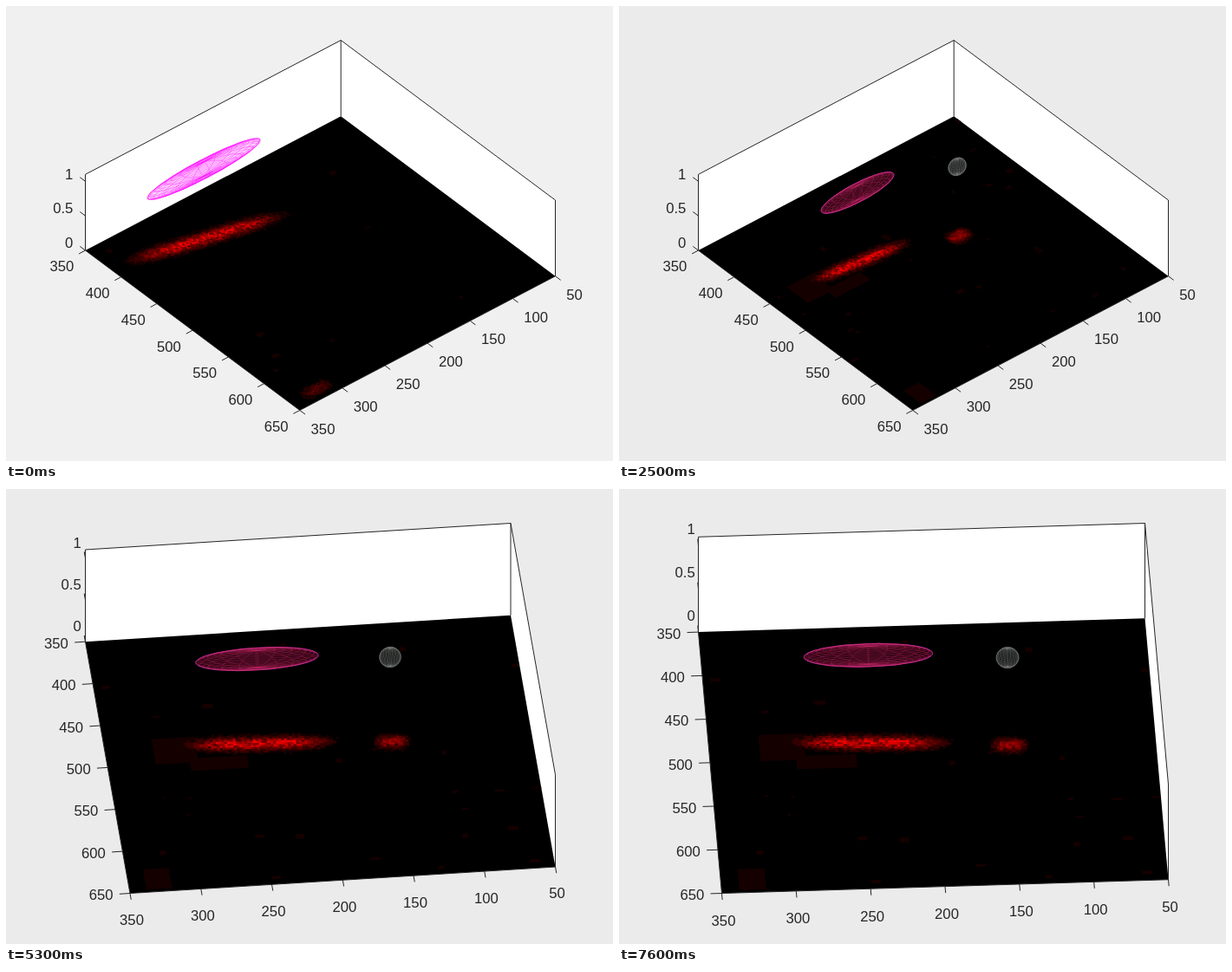
Animation, 700 px wide and 525 px high, one loop 7700 ms. Source, as an HTML page:

```html
<!DOCTYPE html>
<html lang="en">
<head>
<meta charset="utf-8">
<title>Tracked cells</title>
<style>
html, body { margin: 0; width: 100%; height: 100%; overflow: hidden; background: #ebebeb; }
svg { display: block; width: 100%; height: 100%; }
text { font: 16.7px "Liberation Sans", Arial, sans-serif; fill: #262626; }
</style>
</head>
<body>
<svg id="stage" viewBox="0 0 700 525"></svg>
<script>
const LOOP = 7700, STEP = 100, TAU = Math.PI * 2, LEVELS = 9;
// steps at which the cell splits, comes to rest, and the view turns
const SPLIT = 9, REST = 35, TURN = 36, TILT = 55, BACK = 66;
const svg = document.getElementById('stage');

const clamp = (v, lo, hi) => Math.min(hi, Math.max(lo, v));
const mix = (a, b, f) => a + (b - a) * f;
const range = (n, fn) => Array.from({ length: n }, (_, i) => fn(i));

function add(tag, attrs, parent = svg) {
  const el = document.createElementNS('http://www.w3.org/2000/svg', tag);
  set(el, attrs);
  return parent.appendChild(el);
}
function set(el, attrs) {
  for (const k in attrs) el.setAttribute(k, attrs[k]);
}

function rng(seed) {
  let s = (seed * 7919 + 12345) >>> 0;
  return () => {
    s = (s + 0x6D2B79F5) >>> 0;
    let x = Math.imul(s ^ (s >>> 15), 1 | s);
    x = (x + Math.imul(x ^ (x >>> 7), 61 | x)) ^ x;
    return ((x ^ (x >>> 14)) >>> 0) / 4294967296;
  };
}

const back = add('rect', { width: 700, height: 525 });
const walls = add('path', { fill: '#fff' });
const floor = add('path', { fill: '#000' });
const ground = add('g', {});
const dim = add('path', { fill: '#150000' }, ground);
const stains = range(LEVELS, i =>
  add('path', { fill: `rgb(${Math.round(mix(22, 255, i / (LEVELS - 1)))},0,0)` }, ground));
const frame = add('path', { fill: 'none', stroke: '#262626' });
const ticks = add('path', { fill: 'none', stroke: '#262626' });

const makeBall = () => ({ hull: add('path', {}), mesh: add('path', { fill: 'none', 'stroke-width': 0.5 }) });
const bigBall = makeBall(), smallBall = makeBall();

const makeLabels = (n, value, anchor) => range(n, i => {
  const el = add('text', { 'text-anchor': anchor });
  el.textContent = value(i);
  return el;
});
const xLabels = makeLabels(7, i => 350 - 50 * i, 'start');
const yLabels = makeLabels(7, i => 350 + 50 * i, 'end');
const zLabels = makeLabels(3, i => i / 2, 'end');

const pt = p => p[0].toFixed(1) + ' ' + p[1].toFixed(1);
const poly = (...ps) => 'M' + ps.map(pt).join('L');

// two degrees per step: first sideways, then up to the top view and down again
function camera(i) {
  const az = clamp(40 - 2 * (i - TURN), 3, 40);
  const el = i < BACK ? clamp(70 + 2 * (i - TILT), 70, 90) : 90 - 2 * (i - BACK);
  const c = Math.cos(az / 360 * TAU), s = Math.sin(az / 360 * TAU), n = c + s;
  const p = 1 / Math.tan(el / 360 * TAU), W = 542, span = 427 / (n + p);
  const X = [W * c / n, -span * s], Y = [W * s / n, span * c], hz = span * p;
  const O = [91.5, 39.5 + hz - X[1]];
  const at = (u, v, z) => [O[0] + u * X[0] + v * Y[0], O[1] + u * X[1] + v * Y[1] - z * hz / 1.1];
  return { az, s, X, Y, O, hz, at };
}

function drawBox({ at, X, Y, O }) {
  const A = at(0, 0, 0), B = at(0, 1, 0), C = at(1, 1, 0), D = at(1, 0, 0);
  const a = at(0, 0, 1.1), c = at(1, 1, 1.1), d = at(1, 0, 1.1);
  set(walls, { d: poly(A, a, d, D) + 'Z' + poly(D, d, c, C) + 'Z' });
  set(floor, { d: poly(A, B, C, D) + 'Z' });
  set(frame, { d: poly(A, a, d, c, C) + poly(d, D) + poly(A, B, C) });
  set(ground, { transform: `matrix(${[...X, ...Y, ...O].map(n => n.toFixed(3))})` });
}

function drawAxes({ az, s, X, Y, at }) {
  const wide = az > 10;
  let d = '';
  const mark = (el, p, dir, k, dx, dy) => {
    d += poly(p, [p[0] + k * dir[0], p[1] + k * dir[1]]);
    set(el, { x: (p[0] + dx).toFixed(1), y: (p[1] + dy + 6).toFixed(1) });
  };
  xLabels.forEach((el, i) => {
    set(el, { 'text-anchor': wide ? 'start' : 'middle' });
    mark(el, at(i / 6, 1, 0), Y, 0.025, wide ? 3.2 + az * 0.24 : 2, 32.2 - 17.4 * s);
  });
  yLabels.forEach((el, i) =>
    mark(el, at(0, i / 6, 0), X, -0.025, 11.8 * s - 20.8, wide ? 12.5 + az * 0.146 : 1.7));
  zLabels.forEach((el, i) =>
    mark(el, at(0, 0, i / 2), Y, -0.025, -2.9 - 17.5 * s, 17.5 * s - 20));
  set(ticks, { d });
}

function drawBall(ball, cam, { u, v, ru, rv }, look) {
  const rz = 0.104, N = 20;
  const spot = (lon, lat) => cam.at(
    u + ru * Math.cos(lat) * Math.cos(lon), v + rv * Math.cos(lat) * Math.sin(lon), 1 + rz * Math.sin(lat));
  const row = fn => poly(...range(N + 1, fn));
  const d = range(N, j =>
    row(i => spot(j / N * TAU, (i / N - 0.5) * Math.PI)) +
    row(i => spot(i / N * TAU, (j / N - 0.5) * Math.PI))).join('');
  set(ball.mesh, { d, stroke: look.line, 'stroke-opacity': look.alpha });
  // silhouette from the projected axes
  const axes = [cam.X.map(n => n * ru), cam.Y.map(n => n * rv), [0, cam.hz / 1.1 * rz]];
  const mid = cam.at(u, v, 1);
  const rim = range(60, i => {
    const nx = Math.cos(i / 60 * TAU), ny = Math.sin(i / 60 * TAU);
    const dots = axes.map(a => a[0] * nx + a[1] * ny), len = Math.hypot(...dots);
    return mid.map((m, j) => m + axes.reduce((sum, a, k) => sum + a[j] * dots[k], 0) / len);
  });
  set(ball.hull, { d: poly(...rim) + 'Z', fill: look.fill, stroke: look.rim, 'stroke-width': 0.8 });
}

const ON_WHITE = { fill: 'none', rim: '#f5f', line: '#f0f', alpha: 0.65 };
const ON_BLACK = { fill: '#1c0008', rim: '#e03ce0', line: '#d82c70', alpha: 0.5 };
const GREY = { fill: '#080909', rim: '#4c504e', line: '#8a908c', alpha: 0.4 };

function drawStains(i, cells) {
  const rand = rng(i + 3), paths = Array(LEVELS).fill('');
  const cell = (u, v, w, h) =>
    `M${u.toFixed(4)} ${v.toFixed(4)}h${w.toFixed(4)}v${h.toFixed(4)}h${(-w).toFixed(4)}z`;
  let d = '';
  const block = (u, v, w, h) => {
    const a = Math.max(0, u), b = Math.max(0, v);
    d += cell(a, b, Math.min(1, u + w) - a, Math.min(1, v + h) - b);
  };
  const blob = ({ u, v, len, wid, slope, amp }) => {
    const cu = 1 / 150, cv = 1 / 130;
    for (let x = -len * 1.5; x < len * 1.5; x += cu)
      for (let y = -wid * 3; y < wid * 3; y += cv) {
        const across = 0.9 * Math.exp(-((y / wid) ** 2)) + 0.1 * Math.exp(-((y / wid / 2) ** 2));
        const val = amp * across * Math.exp(-((x / len) ** 4)) * (0.4 + 0.8 * rand());
        const px = u + x, py = v + y + slope * x;
        if (val < 0.05 || Math.min(px, py) < 0 || Math.max(px, py) > 0.99) continue;
        paths[Math.min(LEVELS - 1, Math.floor(val * LEVELS))] += cell(px, py, cu * 1.08, cv * 1.08);
      }
  };
  for (let n = i ? 26 : 8; n--;) block(rand(), rand(), 0.006 + rand() * 0.02, 0.006 + rand() * 0.014);
  if (i) {
    const { u, v, ru, slope } = cells[0], left = u - ru, low = v - slope * ru;
    block(left - 0.1, low - 0.03, 0.1, 0.1);
    block(left - 0.02, low + 0.055, 0.135, 0.05);
    block(0.04, 0.91, 0.06, 0.08);
  }
  const fade = 0.3 * (1 - i / SPLIT);
  if (fade > 0) blob({ u: 0.1, v: 0.95, len: 0.05, wid: 0.022, slope: 0, amp: fade });
  cells.forEach(blob);
  set(dim, { d });
  stains.forEach((el, n) => set(el, { d: paths[n] }));
}

// one long cell first, then two that drift apart
function track(i) {
  if (i < SPLIT) {
    const f = i / SPLIT, ru = mix(0.22, 0.233, f);
    return [{ u: mix(0.31, 0.349, f), v: mix(0.183, 0.208, f), ru, rv: 0.028,
      len: ru * 0.92, wid: 0.024, slope: 0.245, amp: 0.95 }];
  }
  const f = clamp((i - SPLIT) / (REST - SPLIT), 0, 1), out = 1 - (1 - f) ** 2;
  const ru = mix(0.135, 0.144, f), r = mix(0.055, 0.025, out);
  return [
    { u: mix(0.287, 0.3575, f), v: mix(0.204, 0.4385, f), ru, rv: 0.028,
      len: ru, wid: 0.02, slope: mix(0.33, 0.06, out), amp: 0.95 },
    { u: mix(0.478, 0.668, out), v: mix(0.335, 0.464, out), ru: r, rv: mix(0.033, 0.02, out),
      len: 0.024 + r * 0.4, wid: 0.021, slope: 0, amp: mix(0.9, 0.65, out) }
  ];
}

function render(i) {
  const cam = camera(i), cells = track(i), [big, small] = cells;
  set(back, { fill: i ? '#ebebeb' : '#f0f0f0' });
  drawBox(cam);
  drawAxes(cam);
  drawStains(Math.min(i, REST), cells);
  drawBall(bigBall, cam, big, big.v > 0.27 ? ON_BLACK : ON_WHITE);
  for (const el of [smallBall.hull, smallBall.mesh]) set(el, { visibility: small ? 'visible' : 'hidden' });
  if (small) drawBall(smallBall, cam, small, GREY);
}

let last = -1;
const start = performance.now();
function tick() {
  const i = Math.floor(((performance.now() - start) % LOOP) / STEP);
  if (i !== last) render(last = i);
  requestAnimationFrame(tick);
}
tick();
</script>
</body>
</html>
```
